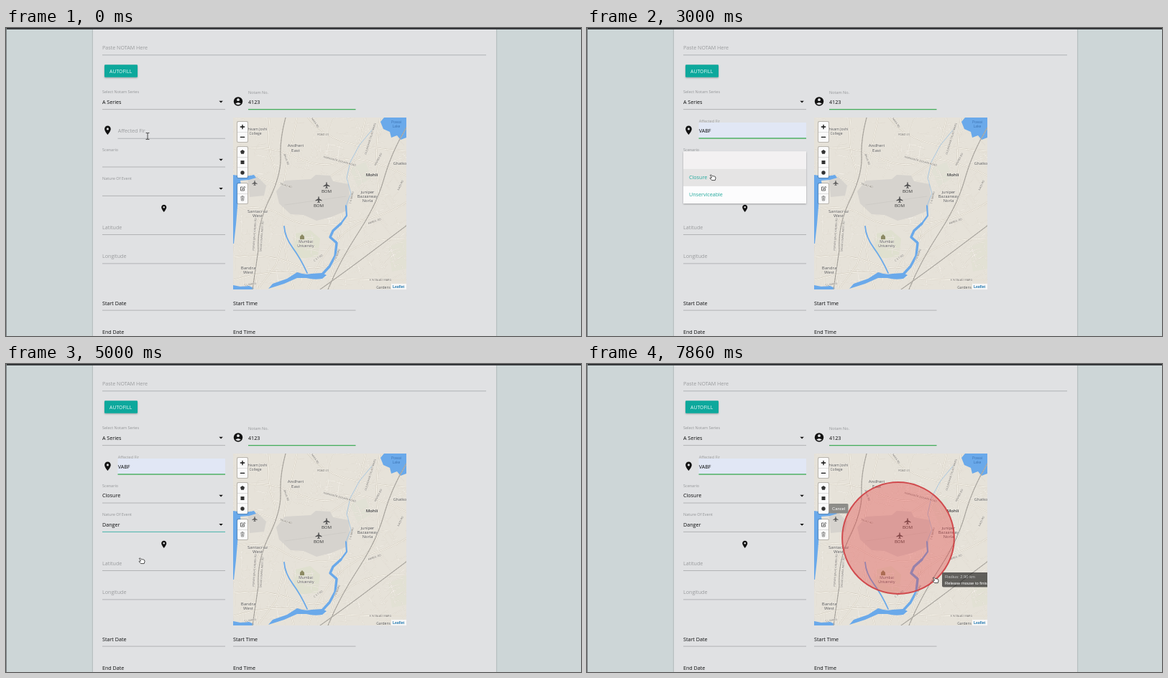
An HTML page for the animation above (8 s loop, 800 by 430 pixels).

```html
<!DOCTYPE html>
<html lang="en">
<head>
<meta charset="utf-8">
<title>Airspace notice form</title>
<style>
html, body { margin: 0; width: 100%; height: 100%; overflow: hidden; background: #cdd6d7; }
svg { display: block; width: 100vw; height: 100vh; }
text { font: 7.15px "Open Sans", "Noto Sans", sans-serif; fill: #0b0c0d; white-space: pre; }
.hint { fill: #999b9d; }
.small { font-size: 5.5px; fill: #929496; }
.button { font-size: 6.7px; letter-spacing: .15px; fill: #eefcfa; }
.teal { fill: #22a99d; }
.bold { font-weight: 600; }
.ui { font: 5.8px "Liberation Sans", Arial, sans-serif; fill: #fff; }
.map text { text-anchor: middle; paint-order: stroke; stroke: #efece6; stroke-width: .8px; stroke-linejoin: round; }
.place { font-size: 6.1px; fill: #505050; }
.road { font-size: 3.8px; fill: #69655f; }
.line { fill: none; stroke-linecap: round; stroke-linejoin: round; }
</style>
</head>
<body>
<svg id="stage" viewBox="0 0 800 430" preserveAspectRatio="none"></svg>
<script>
const LOOP = 8000, STEP = LOOP / 56;
const TEAL = '#1fa99c', GREEN = '#45ad5c', GREY = '#a5a7a9';

let seed = 71;
const rand = (a, b) => {
  seed = (seed * 16807) % 2147483647;
  return a + (b - a) * seed / 2147483647;
};

const text = (x, y, s, cls = '', more = '') => `<text x="${x}" y="${y}" class="${cls}" ${more}>${s}</text>`;
const rect = (x, y, w, h, fill, more = '') => `<rect x="${x}" y="${y}" width="${w}" height="${h}" fill="${fill}" ${more}/>`;
const path = (d, color, width, more = '') => `<path class="line" d="${d}" stroke="${color}" stroke-width="${width}" ${more}/>`;
const area = (d, fill, more = '') => `<path d="${d}" fill="${fill}" ${more}/>`;
const rule = (x, y, w, id = '') => rect(x, y, w, .8, GREY, id && `id="${id}"`);
const caret = y => area(`M296.4 ${y}h5.4l-2.7 2.8z`, '#111');
const group = (id, body, more = '') => `<g id="${id}" ${more}>${body}</g>`;
const pin = (x, y, size, id) => area(
  'M12 2C8.1 2 5 5.1 5 9c0 5.2 7 13 7 13s7-7.8 7-13c0-3.9-3.1-7-7-7zm0 9.5a2.5 2.5 0 1 1 0-5 2.5 2.5 0 0 1 0 5z',
  '#111', `id="${id}" transform="translate(${x} ${y}) scale(${size})"`);
const plane = (x, y, size) => area(
  'M0-5.5Q1-5 1-3v2l5 3v1.4L1 2v2.6l1.4 1v1L0 6-2.4 6.6v-1L-1 4.6V2l-5 1.4V2l5-3v-2Q-1-5 0-5.5z',
  '#4f4f50', `transform="translate(${x} ${y}) scale(${size})"`);

// Dense side streets: pale lanes with a thin edge, roughly on a bent grid
function streets() {
  let lanes = '';
  for (let i = 0; i < 520; i++) {
    const x = rand(312, 560), y = rand(122, 368), len = rand(6, 26);
    const a = rand(-.3, .3) + (i % 2 ? Math.PI / 2 : 0) + (x > 480 ? -.5 : .12);
    const dx = Math.cos(a) * len, dy = Math.sin(a) * len, bend = rand(-3, 3);
    lanes += 'M' + x.toFixed(1) + ' ' + y.toFixed(1)
      + 'q' + [dx / 2 + bend, dy / 2 + bend, dx, dy].map(n => n.toFixed(1)).join(' ');
  }
  return path(lanes, '#d6d0c5', 1.2) + path(lanes, '#f4f1ea', .7);
}

const mainRoads = [
  'M367 125Q362 165 372 190T360 250T350 365', 'M405 125Q398 160 391 190T386 270T400 365',
  'M316 172Q360 160 400 179T465 186T557 206', 'M316 255Q355 243 385 262T470 273T557 243',
  'M500 125Q493 165 482 192T468 250T450 365', 'M520 125Q512 175 518 215T484 277T420 365',
  'M316 320Q360 313 400 329T470 318T557 295', 'M340 205Q373 216 400 223T450 208L492 180',
  'M420 125Q438 148 468 158T557 172', 'M316 352Q370 335 420 344T557 352', 'M350 365L376 330L388 283'
];
const rails = [
  'M389 125Q381 155 382 180T366 240T351 310L343 365',
  'M557 276Q525 300 500 319T437 365',
  'M557 139Q536 174 526 210T490 286T448 365'
];
const places = [
  [350, 143, 'hivam Joshi', 5], [347, 149, 'College', 5], [403, 166, 'Andheri'], [403, 173, 'East'],
  [548, 191, 'Ghatko', 5.5], [350, 258, 'Santacruz'], [350, 264, 'West'],
  [417, 300, 'Mumbai', 5], [417, 305.5, 'University', 5], [337, 336.5, 'Bandra'], [337, 343, 'West'],
  [503, 231, 'juniper', 5.7], [503, 237, 'Bazaarway', 5.7], [503, 242.5, 'Norla', 5.7], [525, 364, 'Gardens', 5]
];
const roadNames = [
  [441, 150, 0, 'ROAD 23'], [464, 187, 15, 'HARIKANTA DOSANI ROAD'], [508, 155, -73, 'GULMOHAR TALAO MARG'],
  [389, 221, 18, 'TALAO RD'], [513, 271, -20, 'AMBOL RD'], [357, 291, -86, 'SAGAR KINARA WEST RD'],
  [347, 288, -86, 'PURANI BAUG KINARA RD'], [462, 317, -70, 'T K MARG'], [482, 237, -78, 'T K MARG'],
  [521, 353, 0, 'E N TALAO MARG'], [340, 359, -10, 'S L MARG'], [519, 184, -62, 'KINARA RD'],
  [389, 184, 70, 'BAUG RD'], [429, 133, 55, 'NAKA RD'], [435, 322, -35, 'C S T RD'], [550, 220, -65, 'NADI RD']
];

function mapArt() {
  const water = '#6aa9ea', river = (d, width) => path(d, water, width);
  return rect(316, 125, 241, 240, '#e6e2d9')
    + area('M403 287l20-5 14 12-3 25-25 3-12-14z', '#dfe0cf')
    + area('M532 306l25-12v42l-20 4z', '#e2e1d4') + area('M478 196l22-9 9 22-20 12z', '#e1e1d5')
    + streets()
    + mainRoads.map(d => path(d, '#cfc8bb', 1.7) + path(d, '#f8f5ed', 1)).join('')
    + area('M376 228l12-15 36-2 7-6 20 1 4 8 22 4 1 20-4 17-22 9-20 5-18-8-18-1-16-15z', '#d6d3ce')
    + area('M336 206l14 2 12 12-3 14-20 2z', '#d6d3ce')
    + path('M388 247L473 235', '#ccc9c5', .8)
    + area('M316 205l7 1 6 2 16-3 3 4-10 3-12 1 2 16-5 5-1 16-2 24-3 27h-1z', water)
    + area('M521 131l5-6h31v28l-8 3-5-6-8 3-2-8-9-4z', water)
    + area('M405 341q11 4 20 2l15-1 6 3-6 5q-12 2-22-1l-13 0-18 8-22 7 6-7 20-7z', water)
    + area('M316 359l10 2 12-1 7 3-2 2h-27z', water)
    + river('M387 277Q388 292 399 307T419 342', 1.8)
    + river('M473 248L474 262L466 273', 2.2)
    + river('M466 273L455 283L451 292L460 300L458 318L450 333L438 346', 3.4)
    + path('M473 248L480 231L474 209L479 187L492 163L512 139', '#a3c4e0', .9)
    + rails.map(d => path(d, '#bebab3', 1.2) + path(d, '#8f8b85', .6, 'stroke-dasharray="2.5 1.4"')).join('')
    + area('M409 291h6v4h-6zl3-3 3 3z', '#8c8a63')
    + roadNames.map(([x, y, a, s]) => text(x, y, s, 'road', `transform="rotate(${a} ${x} ${y})"`)).join('')
    + places.map(([x, y, s, size = 6.1]) => text(x, y, s, 'place', `style="font-size:${size}px"`)).join('')
    + text(509, 207, 'Mohli', 'place bold', 'style="fill:#333"')
    + text(543, 133, 'Powai', 'place', 'style="font-size:5px;fill:#3d74b3;stroke:none"')
    + text(543, 139, 'Lake', 'place', 'style="font-size:5px;fill:#3d74b3;stroke:none"')
    + plane(446, 219, .75) + plane(435, 239, .75) + plane(346, 216, .6)
    + text(446, 230, 'BOM', 'place', 'style="fill:#3a3a3a;stroke:none"')
    + text(435, 250, 'BOM', 'place', 'style="fill:#3a3a3a;stroke:none"');
}

const toolBox = (y, h, splits) => rect(321, y - 1, 16, h + 2, '#0003', 'rx="2"') + rect(322, y, 14, h, '#fafafa', 'rx="1.5"')
  + splits.map(s => rect(322, s, 14, .6, '#ccc')).join('');
const controls = toolBox(131, 28, [145]) + toolBox(166, 43, [180, 194.5]) + toolBox(217, 28, [231])
  + path('M326.3 138h5.4M329 135.3v5.4M326.3 152.3h5.4', '#111', 1.3)
  + area('M329 170l3 2.1-1.1 3.7h-3.8l-1.1-3.7z', '#333') + rect(326.5, 185, 5, 5, '#333')
  + '<circle cx="329" cy="202" r="2.7" fill="#333"/>'
  + path('M329 222h-2.5v5h5v-2.2M328.7 225.3l.3-1.4 2.7-2.7 1 1-2.7 2.7z', '#444', .8)
  + path('M326.5 235.8h5M328 235.5v-1h2v1M327 236.5l.4 4.5h3.2l.4-4.5M328.4 237v3M329.6 237v3', '#777', .7)
  + rect(536, 357, 21, 8, '#f7f7f7') + text(538, 363, 'Leaflet', 'ui bold', 'style="font-size:5px;font-weight:700;fill:#2278b0"');

const menu = (id, x, y, w, h, body) => group(id, rect(x, y, w, h, '#fcfcfd', 'filter="url(#shade)"') + body);

document.getElementById('stage').innerHTML = `
<defs>
  <clipPath id="mapEdge"><rect x="316" y="125" width="241" height="240"/></clipPath>
  <filter id="shade" x="-20%" y="-20%" width="140%" height="150%"><feDropShadow dx="0" dy="1" stdDeviation="1.2" flood-opacity=".3"/></filter>
</defs>`
  + rect(0, 0, 800, 430, '#cdd6d7')
  + rect(121, -10, 561, 460, '#e0e1e3', 'filter="url(#shade)"')
  + rect(0, 0, 800, 2, '#35373a') + rect(0, 0, 1, 430, '#7c8385')
  + text(134, 30.3, 'Paste NOTAM Here', 'hint') + rule(134, 37.4, 534)
  + rect(137, 51.3, 46, 17.4, '#0ca89c', 'rx="1.2" filter="url(#shade)"') + text(144, 62.6, 'AUTOFILL', 'button')
  + text(134, 91.3, 'Select Notam Series', 'small') + text(134, 105.7, 'A Series') + caret(101.8) + rule(134, 113.3, 171)
  + '<circle cx="323" cy="102.5" r="6.2" fill="#111"/><circle cx="323" cy="100.2" r="1.9" fill="#e0e1e3"/>'
  + area('M319.2 105.5q3.8-3 7.6 0-3.8 3.6-7.6 0z', '#e0e1e3')
  + text(337, 91.6, 'Notam No.', 'small') + text(337, 105.7, '4123') + rect(337, 113, 149.5, 1.3, GREEN)
  + pin(134, 135.3, .62, 'firPin')
  + text(0, 0, 'Affected Fir', 'hint', 'id="firLabel"')
  + group('firValue', rect(155.5, 132, 149.5, 22, '#e1e7f5') + text(155.7, 145.8, 'VABF'))
  + rule(155.5, 153.8, 149.5, 'firLine') + rect(155.6, 138, .7, 10, '#222', 'id="inputCaret"')
  + text(134, 172.2, 'Scenario', 'small') + text(134, 186.4, 'Closure', '', 'id="closure"') + caret(182.7) + rule(134, 193.6, 171, 'scenarioLine')
  + text(134, 212.3, 'Nature Of Event', 'small') + text(134, 226.6, 'Danger', '', 'id="danger"') + caret(222.9) + rule(134, 233.9, 171, 'natureLine')
  + pin(213.6, 245.7, .51, 'placePin')
  + text(134, 280.7, 'Latitude', 'hint') + rule(134, 288.2, 171)
  + text(134, 321.3, 'Longitude', 'hint') + rule(134, 328.5, 171)
  + text(134, 386.5, 'Start Date') + rule(134, 393.7, 171) + text(316, 386.5, 'Start Time') + rule(316, 393.7, 170.5)
  + text(134, 427, 'End Date') + text(316, 427, 'End Time')
  + '<g clip-path="url(#mapEdge)">'
  + `<g class="map">${mapArt()}</g>`
  + '<circle id="zone" cx="433" cy="243" fill="#e33b3b" fill-opacity=".36" stroke="#cf3f43" stroke-opacity=".9" stroke-width="2"/>'
  + controls
  + group('cancel', rect(336.5, 195, 27, 13.5, '#8d8c88', 'rx="1.5"') + text(341, 203.8, 'Cancel', 'ui'))
  + group('drawTip', rect(0, -6, 82, 12, '#000', 'rx="2" opacity=".55"') + text(4, 2, 'Click and drag to draw circle.', 'ui'))
  + group('dragTip', rect(0, -11, 84, 20.5, '#000', 'rx="2" opacity=".58"') + text(4, -3, '', 'ui', 'id="radius" style="fill:#c8c8c8"') + text(4, 5.8, 'Release mouse to finish drawing.', 'ui'))
  + '</g>'
  + menu('firMenu', 155.5, 156, 149.5, 37.5, rect(155.5, 158, 149.5, 16, '#e9eaeb') + text(161, 168.6, 'VABF', 'bold') + text(161, 184.5, 'VECC', 'bold'))
  + menu('scenarioMenu', 134, 172.5, 171, 72.5, rect(134, 172.5, 171, 24.2, '#f3f1f2') + rect(134, 196.7, 171, 24.2, '#e5e4e4')
    + text(142, 211.4, 'Closure', 'teal') + text(142, 235.4, 'Unserviceable', 'teal'))
  + menu('natureMenu', 134, 212.5, 171, 96.5, rect(134, 212.5, 171, 24.2, '#e6e4e5') + rect(134, 261, 171, 24, '#efedee')
    + text(142, 251.5, 'Prohibited', 'teal') + text(142, 275.6, 'Danger', 'teal') + text(142, 299.7, 'Restricted', 'teal'))
  + group('status', rect(0, 420, 268.5, 10, '#434547', 'rx="1"') + text(1.5, 427.6, 'localhost:5000/admin_airspace#', '', 'style="font-size:6.7px;fill:#a5a7a8"'))
  + group('ibeam', path('M-2-4.5h1.4l.6.6.6-.6H2M0-4v8M-2 4.5h1.4l.6-.6.6.6H2', '#222', .8))
  + group('arrow', '<path d="M0 0v8.2l1.9-1.7 1.4 3 1.4-.7-1.4-2.8h2.5z" fill="#fff" stroke="#222" stroke-width=".8"/>')
  + group('hand', '<path d="M-3.7-3.5q.8-1 2 .1L0-2l1.7-.2 1.9 1 .4 2-.8 2.8H-1.3L-3.8 1q-.2-1.1 1-.9l1 .4.1-1.4z" fill="#fff" stroke="#222" stroke-width=".8" stroke-linejoin="round"/>')
  + group('cross', path('M-5 0h10M0-5v10', '#f5f5f5', 2) + path('M-5 0h10M0-5v10', '#222', .9));

const $ = {};
document.querySelectorAll('[id]').forEach(e => $[e.id] = e);

// Pointer stops: time, x, y, shape until the next stop
const stops = [
  [0, 197, 151, 'ibeam'], [570, 197, 150, 'ibeam'], [860, 195, 165, 'arrow'], [1140, 193, 169, 'arrow'],
  [1570, 192, 167, 'arrow'], [2140, 183, 184, 'hand'], [2570, 182, 186, 'hand'], [3000, 175, 209, 'hand'],
  [3290, 174, 209, 'hand'], [3710, 184, 225, 'hand'], [3860, 185, 227, 'hand'], [4290, 189, 273, 'hand'],
  [5000, 189, 275, 'hand'], [5140, 189, 275, 'arrow'], [5860, 330, 200, 'hand'], [6290, 330, 202, 'cross'],
  [6860, 430, 241, 'cross'], [7140, 433, 244, 'hand'], [7860, 485, 302, 'hand'], [LOOP, 485, 302, 'hand']
];

const ramp = (t, a, d) => Math.max(0, Math.min(1, (t - a) / d));
const during = (t, a, b, fade = 0) => fade
  ? Math.min(ramp(t, a - fade, 2 * fade), 1 - ramp(t, b - fade, 2 * fade))
  : +(t >= a && t < b);
const place = (e, x, y) => e.setAttribute('transform', `translate(${x} ${y})`);
const show = (id, v) => $[id].style.opacity = v;
const tint = (id, color) => $[id].setAttribute('fill', color);

function pointer(t) {
  let i = stops.length - 2;
  while (i && stops[i][0] > t) i--;
  const [a, x, y, shape] = stops[i], [b, x2, y2] = stops[i + 1];
  const p = ramp(t, a, b - a), k = p * p * (3 - 2 * p);
  return { x: x + (x2 - x) * k, y: y + (y2 - y) * k, shape };
}

function render(time) {
  const t = Math.floor((time % LOOP + 3) / STEP) * STEP + 3;
  const { x, y, shape } = pointer(t);
  ['ibeam', 'arrow', 'hand', 'cross'].forEach(c => show(c, +(c === shape)));
  place($[shape], x, y);

  const focused = during(t, 280, 1570), lift = ramp(t, 280, 280);
  $.firLabel.setAttribute('transform', `translate(155.7 ${145.8 - 13.8 * lift}) scale(${1 - .23 * lift})`);
  $.firLabel.style.fill = focused ? TEAL : '#999b9d';
  tint('firPin', focused ? TEAL : '#111');
  tint('firLine', focused ? TEAL : t > 1570 ? GREEN : GREY);
  $.firLine.setAttribute('height', t > 280 ? 1.4 : .8);
  $.firLine.setAttribute('y', t > 280 ? 153.3 : 153.8);
  show('inputCaret', focused);
  show('firValue', +(t >= 990));
  show('firMenu', during(t, 700, 1430));

  show('scenarioMenu', during(t, 2500, 3500, 140));
  show('closure', +(t >= 3290));
  tint('scenarioLine', during(t, 2290, 3710) ? TEAL : GREY);
  show('natureMenu', during(t, 3930, 4780, 140));
  show('danger', +(t >= 4570));
  tint('natureLine', during(t, 3860, 5290) ? TEAL : GREY);

  show('status', .94 * during(t, 5850, 6990));
  show('cancel', +(t >= 6280));
  const dragging = t >= 7140;
  show('drawTip', during(t, 6280, 7140));
  show('dragTip', +dragging);
  show('zone', +dragging);
  place($.drawTip, x + 7, y);
  place($.dragTip, x + 9, y);
  const r = dragging ? Math.hypot(x - 433, y - 244) : 0;
  $.zone.setAttribute('r', r);
  $.radius.textContent = `Radius: ${(r * 2.9 / 77.9).toFixed(2)} km`;
}

const start = performance.now();
function tick() {
  render(performance.now() - start);
  requestAnimationFrame(tick);
}
tick();
</script>
</body>
</html>
```
